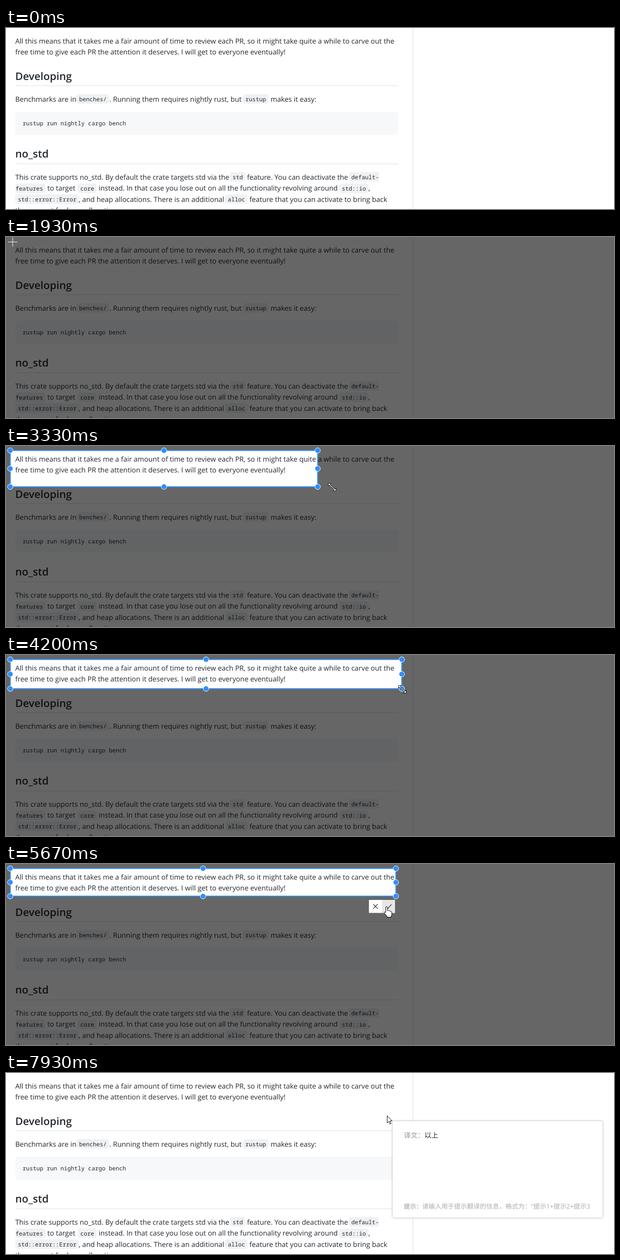
Write an HTML page that moves like this. It is 1280 px wide and 383 px high and loops after 8000 ms.

```html
<!DOCTYPE html>
<html lang="zh-CN">
<head>
<meta charset="utf-8">
<style>
html, body { margin: 0; width: 100%; height: 100%; overflow: hidden; background: #fff; }
svg { display: block; }
text { font: 14.8px "Open Sans", "Noto Sans", "Noto Sans CJK SC", sans-serif; fill: #24292f; white-space: pre; text-rendering: geometricPrecision; }
.h { font-size: 22.1px; font-weight: 600; }
.code { font: 12.1px "Noto Sans Mono", monospace; }
.rule { fill: #d8dee4; }
#popup rect { fill: #fff; filter: drop-shadow(0 0 2px rgba(0,0,0,.35)); }
#popup text { font-size: 14.6px; }
#popup .label { fill: #909399; }
#popup .hint { font-size: 13.5px; fill: #a9abb0; }
#cursors path { fill: #fff; stroke: #000; }
#cursors #cross { fill: none; stroke: #fff; }
#handles circle { fill: #2f8fff; stroke: #fff; }
</style>
</head>
<body>
<svg width="1280" height="383" viewBox="0 0 1280 383">
  <g id="page">
    <rect class="rule" x="856.5" width="1" height="383"/>
    <rect class="rule" x="20" y="121.5" width="806" height="1"/>
    <rect class="rule" x="20" y="287" width="806" height="1"/>
    <rect x="19.5" y="177.5" width="806" height="48.5" rx="5.5" fill="#f6f8fa"/>
    <text class="h" x="19.5" y="110">Developing</text>
    <text class="h" x="19.5" y="274">no_std</text>
    <text class="code" x="35" y="206">rustup run nightly cargo bench</text>
  </g>
  <g id="capture">
    <path id="shade" fill="rgba(0,0,0,.6)" fill-rule="evenodd"/>
    <path id="frame" fill="none" stroke="#2f8fff" stroke-width="2"/>
    <g id="handles"></g>
    <g id="buttons">
      <rect x="764" y="76" width="55" height="27.5" fill="#fff"/>
      <rect id="hover" x="791.5" y="76" width="27.5" height="27.5" fill="#e6e6e6"/>
      <path d="M773 85l9.5 9.5M782.5 85l-9.5 9.5M800 90l4 4 7.500-8.500" fill="none" stroke="#333" stroke-width="1.2"/>
    </g>
  </g>
  <g id="popup">
    <rect x="814" y="102" width="442" height="204"/>
    <g id="labels">
      <text class="label" x="837.5" y="137">译文：</text>
      <text id="result" x="881" y="137"></text>
      <text class="label" x="837.5" y="287" style="font-size:13px">提示：</text>
      <text class="hint" x="876" y="287">请输入用于提示翻译的信息，格式为：“提示1+提示2+提示3</text>
    </g>
  </g>
  <g id="cursors">
    <path id="cross" d="M-10 0H10M0-10V10"/>
    <path id="resize" d="M-8-8H-2L-4.300-5.700 5.700 4.300 8 2V8H2L4.300 5.700-5.700-4.300-8-2Z"/>
    <path id="hand" d="M-1.500 1.500Q-1.500 0 .2 0T2 1.500V8l1-.5q2-.3 2.300 1.200 2.500-.8 3 1 2.500-.3 2.800 1.800V16q0 2-1.500 4v2H1v-2L-4 14q-1.500-2 0-3 1.300-.7 2.500 1.500Z"/>
    <path id="arrow" d="M0 0V15L3.500 11.900 5.900 17.500 8.100 16.500 5.800 11H10.500Z"/>
  </g>
</svg>
<script>
const $ = id => document.getElementById(id);
const add = (parent, tag, attrs, text = '') => {
  const el = document.createElementNS('http://www.w3.org/2000/svg', tag);
  for (const key in attrs) el.setAttribute(key, attrs[key]);
  el.textContent = text;
  parent.append(el);
  return el;
};

// Inline code; a padding of 0 gives a square end where the chip wraps
function chip(x, y, s, left = 5.5, right = 5) {
  const x0 = x - left, x1 = x + s.length * 7.26 + right;
  const a = left ? 5 : 0, b = right ? 5 : 0;
  const d = `M${x0 + a} ${y - 15}H${x1 - b}a${b} ${b} 0 0 1 ${b} ${b}v${20 - 2 * b}a${b} ${b} 0 0 1 ${-b} ${b}` +
    `H${x0 + a}a${a} ${a} 0 0 1 ${-a} ${-a}v${2 * a - 20}a${a} ${a} 0 0 1 ${a} ${-a}Z`;
  add($('page'), 'path', { d, fill: '#eff1f3' });
  add($('page'), 'text', { x, y, class: 'code' }, s);
}

[
  [19.5, 33, 'All this means that it takes me a fair amount of time to review each PR, so it might take quite a while to carve out the'],
  [19.5, 56, 'free time to give each PR the attention it deserves. I will get to everyone eventually!'],
  [19.5, 155.5, 'Benchmarks are in'],
  [217.5, 155.5, '. Running them requires nightly rust, but'],
  [557, 155.5, 'makes it easy:'],
  [19.5, 320.5, 'This crate supports no_std. By default the crate targets std via the'],
  [507.5, 320.5, 'feature. You can deactivate the'],
  [87, 344, 'to target'],
  [195, 344, 'instead. In that case you lose out on all the functionality revolving around'],
  [763, 344, ','],
  [153, 367.5, ', and heap allocations. There is an additional'],
  [512.5, 367.5, 'feature that you can activate to bring back'],
  [19.5, 391, 'the support for heap allocations.']
].forEach(([x, y, s]) => add($('page'), 'text', { x, y }, s));

chip(154, 155, 'benches/');
chip(504, 155, 'rustup');
chip(477, 320, 'std');
chip(727, 320, 'default-', 5, 0);
chip(20, 344, 'features', 0);
chip(156.5, 344, 'core');
chip(707, 344, 'std::io');
chip(25, 367, 'std::error::Error');
chip(467, 367, 'alloc');

const dots = Array.from({ length: 8 }, () => add($('handles'), 'circle', { r: 5.7 }));

// Pointer path: [tick, x, y], 15 ticks per second
const path = [
  [17, 420, 400], [28, 19, 12], [30, 9, 9], [32, 9, 9], [37, 50, 52], [41, 139.5, 71.5],
  [45, 493, 89], [46, 540, 89], [52, 760, 86], [58, 826, 78], [60, 834.2, 72.5], [63, 834.5, 72.5],
  [75, 823.5, 69.5], [76, 822, 69.3], [78, 822, 70], [82, 806, 87], [85, 801, 90.5]
];
function pointer(k) {
  const i = path.findIndex(p => p[0] > k);
  if (i < 0) return path[path.length - 1].slice(1);
  if (!i) return path[0].slice(1);
  const [k0, x0, y0] = path[i - 1], [k1, x1, y1] = path[i];
  const u = (k - k0) / (k1 - k0);
  return [x0 + (x1 - x0) * u, y0 + (y1 - y0) * u];
}

const show = (id, on) => $(id).style.display = on ? '' : 'none';

function draw(k) {
  const selecting = k >= 33;
  show('capture', k >= 16 && k < 93);
  show('frame', selecting);
  show('handles', k >= 42);
  show('buttons', k >= 77);
  show('hover', k >= 82);

  // The selection trails the pointer until the button is released
  const [x, y] = pointer(Math.min(k, 76.8) - 0.8).map(v => v - 1.2);
  const L = 9, T = 9.5;
  const box = selecting ? `M${L} ${T}H${x}V${y}H${L}Z` : '';
  $('shade').setAttribute('d', 'M0 0H1280V383H0Z' + box);
  $('frame').setAttribute('d', box);
  const mx = (L + x) / 2, my = (T + y) / 2;
  [[L, T], [mx, T], [x, T], [L, my], [x, my], [L, y], [mx, y], [x, y]].forEach(([cx, cy], i) => {
    dots[i].setAttribute('cx', cx);
    dots[i].setAttribute('cy', cy);
  });

  const kind = k < 17 ? '' : k < 33 ? 'cross' : k < 79 ? 'resize' : k < 82 ? 'cross' : k < 93 ? 'hand' : 'arrow';
  for (const id of ['cross', 'resize', 'hand', 'arrow']) show(id, id === kind);
  const [px, py] = kind === 'arrow' ? [802.5, 90.5] : pointer(k);
  $('cursors').setAttribute('transform', `translate(${px} ${py})`);

  show('popup', k >= 95);
  $('popup').style.opacity = k < 96 ? 0.6 : 1;
  show('labels', k >= 111);
  $('result').textContent = k < 119 ? '正在翻译中..' : '以上';
}

const start = performance.now();
function tick() {
  const t = (performance.now() - start) % 8000;
  draw(Math.floor((t + 4) * 15 / 1000) % 120);
  requestAnimationFrame(tick);
}
tick();
</script>
</body>
</html>
```
